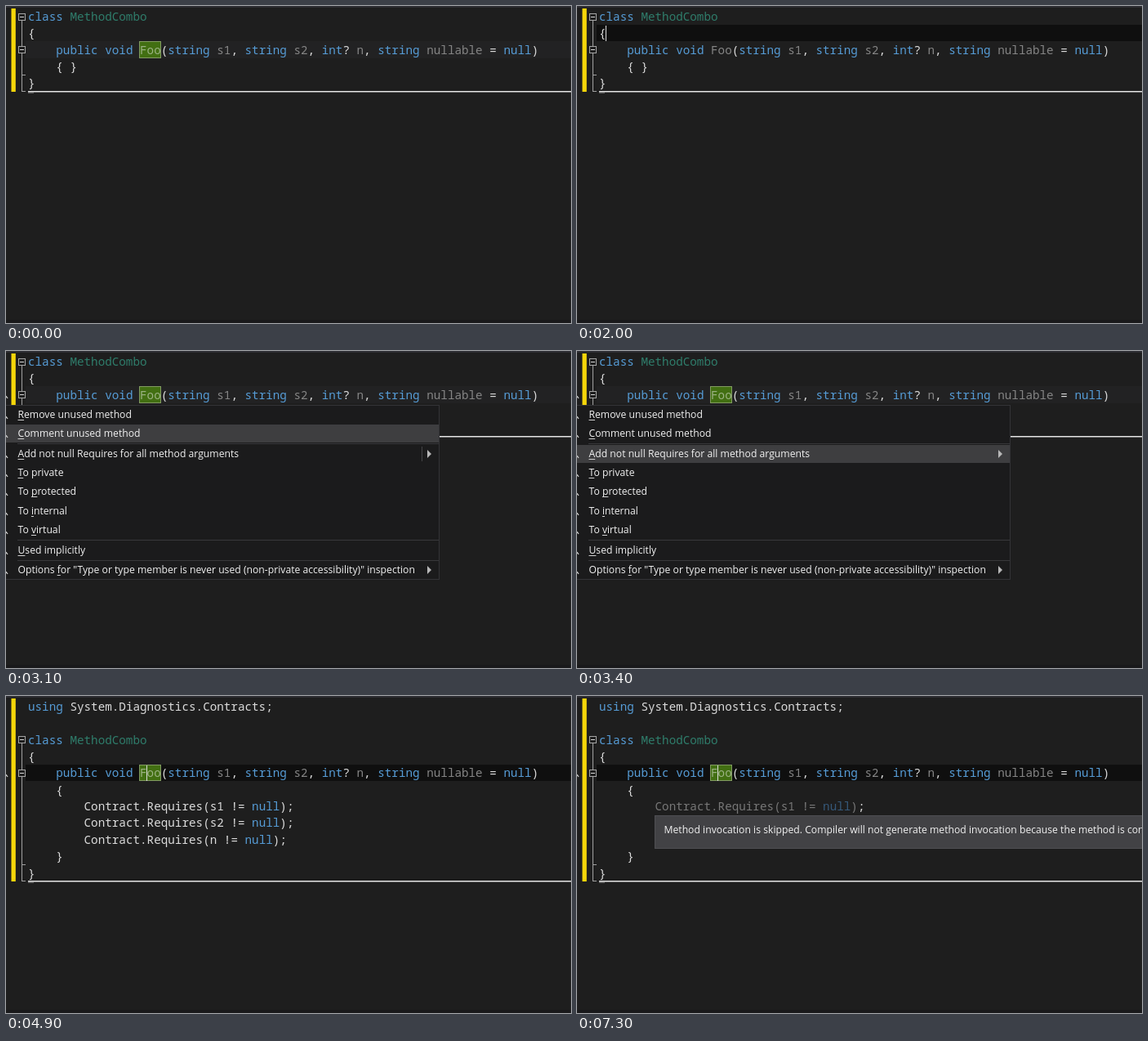
Animation of 692 by 388 pixels, one loop 7.4 s. Source, as an HTML page with a canvas:

```html
<!DOCTYPE html>
<html>
<head>
<meta charset="utf-8">
<style>
html, body { margin: 0; width: 100%; height: 100%; overflow: hidden; background: #1e1e1e; }
canvas { display: block; }
</style>
</head>
<body>
<canvas id="stage" width="692" height="388"></canvas>
<script>
const ctx = document.getElementById('stage').getContext('2d');
const LOOP = 7400, LEFT = 27, COL = 8.565, ROW = 20.35, BLINK = 530;
const CODE = '14.275px "Noto Sans Mono", monospace';
const UI = '12.2px "Open Sans", sans-serif';
const PLAIN = '#dcdcdc', BLUE = '#569cd6', TYPE = '#2f7d6b', GREY = '#858585';

const SIGNATURE = '    public void Foo(string s1, string s2, int? n, string nullable = null)';
const BEFORE = ['class MethodCombo', '{', SIGNATURE, '    { }', '}'];
const AFTER = ['using System.Diagnostics.Contracts;', '', 'class MethodCombo', '{', SIGNATURE, '    {',
  ...['s1', 's2', 'n'].map(a => `        Contract.Requires(${a} != null);`), '    }', '}'];

// [label with & before the access key, centre y, has submenu]
const MENU = [
  ['&Remove unused method', 78], ['&Comment unused method', 101],
  ['&Add not null Requires for all method arguments', 126, true],
  ['&To private', 149], ['To &protected', 172], ['To &internal', 196], ['To &virtual', 219],
  ['&Used implicitly', 244],
  ['Options &for "Type or type member is never used (non-private accessibility)" inspection', 268, true]
];
const TIP = 'Method invocation is skipped. Compiler will not generate method invocation because ' +
  'the method is conditional, or it is partial method without implementation';

function box(x, y, w, h, color) {
  ctx.fillStyle = color;
  ctx.fillRect(x, y, w, h);
}

function frame(x, y, w, h, color) {
  ctx.strokeStyle = color;
  ctx.lineWidth = 1;
  ctx.strokeRect(x + .5, y + .5, w - 1, h - 1);
}

function text(s, x, y, color) {
  ctx.fillStyle = color;
  ctx.fillText(s, x, y);
}

const rowTop = row => Math.round(2.6 + row * ROW);
const rowHeight = row => rowTop(row + 1) - rowTop(row);

function tokenColor(word, line, s) {
  const call = line.includes('Contract.');
  if (/^(class|using|public|void|string|int|null)$/.test(word)) return call && s.dimNull ? '#36597a' : BLUE;
  if (word === 'MethodCombo') return TYPE;
  if (word === 'Foo') return s.green ? '#9bb283' : GREY;
  if (call) return s.dim && word !== ';' ? '#777' : PLAIN;
  return /^(s1|s2|n|nullable)$/.test(word) ? GREY : PLAIN;
}

function drawCode(s) {
  const lines = s.done ? AFTER : BEFORE;
  const top = s.done ? 2 : 0, method = top + 2, last = lines.length - 1;
  const y = rowTop(method), end = rowTop(lines.length);

  box(24, rowTop(s.row), 668, rowHeight(s.row), s.active ? '#0f0f0f' : '#222223');
  box(6.5, 3, 5.3, end - 2, '#f5d60a');

  // outlining margin
  box(19, rowTop(top) + 10, 1, end - rowTop(top) - 10, '#a0a0a0');
  box(19, rowTop(last), 5, 1, '#a0a0a0');
  box(19, end, 5, 1, '#a0a0a0');
  for (const r of [top, method]) {
    const by = rowTop(r) + 6;
    box(15, by, 9, 9, '#1e1e1e');
    frame(15, by, 9, 9, '#a5a5a5');
    box(17, by + 4, 5, 1, '#d8d8d8');
  }
  box(LEFT, end, 665, 1.5, '#e6e6e6');
  box(LEFT, end + 1.5, 7, 1, '#a0a0a0');

  if (s.green) {
    box(163, y, 27, rowHeight(method), '#426f12');
    frame(163, y, 27, rowHeight(method), '#819a61');
  }
  ctx.font = CODE;
  lines.forEach((line, i) => {
    for (const m of line.matchAll(/\w+|[^\w\s]/g))
      text(m[0], LEFT + m.index * COL, Math.round(18 + i * ROW), tokenColor(m[0], line, s));
  });
  if (s.caret) box(Math.floor(LEFT + s.col * COL), rowTop(s.row) + 1, 1, 19, '#dcdcdc');
  if (s.icon) mark(y + 12);
}

// visible tip of an icon cut off by the left edge
function mark(y) {
  ctx.strokeStyle = '#c8c8c8';
  ctx.lineWidth = 1.3;
  ctx.beginPath();
  ctx.moveTo(0, y);
  ctx.lineTo(2, y + 3);
  ctx.stroke();
}

function drawMenu(selected) {
  box(0, 66, 531, 214, '#1b1b1c');
  frame(-1, 66, 532, 214, '#333337');
  for (const y of [113, 231, 256]) box(14, y, 516, 1, '#38383b');
  ctx.font = UI;
  MENU.forEach(([label, y, sub], i) => {
    if (i === selected) box(0, y - 11, 530, 22, '#3e3e40');
    const at = label.indexOf('&'), s = label.replace('&', '');
    const x = 14.5 + ctx.measureText(s.slice(0, at)).width;
    text(s, 14.5, y + 4.3, '#f1f1f1');
    box(x, y + 6, ctx.measureText(s[at]).width, 1, '#d0d0d0');
    mark(y + 2);
    if (!sub) return;
    if (i === 2 && i !== selected) box(509, y - 9, 1, 18, '#444447');
    ctx.fillStyle = '#b8b8b8';
    ctx.beginPath();
    ctx.moveTo(516, y - 5);
    ctx.lineTo(521, y);
    ctx.lineTo(516, y + 5);
    ctx.fill();
  });
}

function drawTip(alpha) {
  ctx.globalAlpha = alpha;
  box(95, 146, 620, 41, '#424245');
  frame(95, 146, 620, 41, '#4f4f53');
  ctx.font = UI;
  text(TIP, 106.5, 168.3, '#f1f1f1');
  ctx.globalAlpha = 1;
}

function stateAt(t) {
  const within = (a, b) => t >= a && t < b;
  const done = t >= 4900, brace = within(750, 2100), menu = within(2500, 4100);
  const active = t >= 100 && !menu && !within(4100, 4400);
  const click = brace ? 750 : done ? 4900 : t >= 4400 ? 4400 : 2100;
  return {
    done, menu, active,
    row: done ? 4 : brace ? 1 : 2,
    col: brace ? 1 : 17,
    caret: active && t >= 750 && Math.floor((t - click) / BLINK) % 2 === 0,
    green: !within(900, 2300) && !within(5400, 6300),
    icon: t >= 2400,
    dim: t >= 5200,
    dimNull: t >= 5400,
    selected: t < 3000 ? 0 : t < 3300 ? 1 : 2,
    tip: Math.min(1, Math.max(0, (t - 6500) / 300))
  };
}

function draw(now) {
  const s = stateAt(now % LOOP);
  box(0, 0, 692, 388, '#1e1e1e');
  box(0, 0, 692, 2, '#2d2d32');
  box(0, 384, 692, 4, '#19191b');
  drawCode(s);
  if (s.menu) drawMenu(s.selected);
  if (s.tip) drawTip(s.tip);
}

const start = performance.now();
function tick() {
  draw(performance.now() - start);
  requestAnimationFrame(tick);
}
tick();
</script>
</body>
</html>
```
